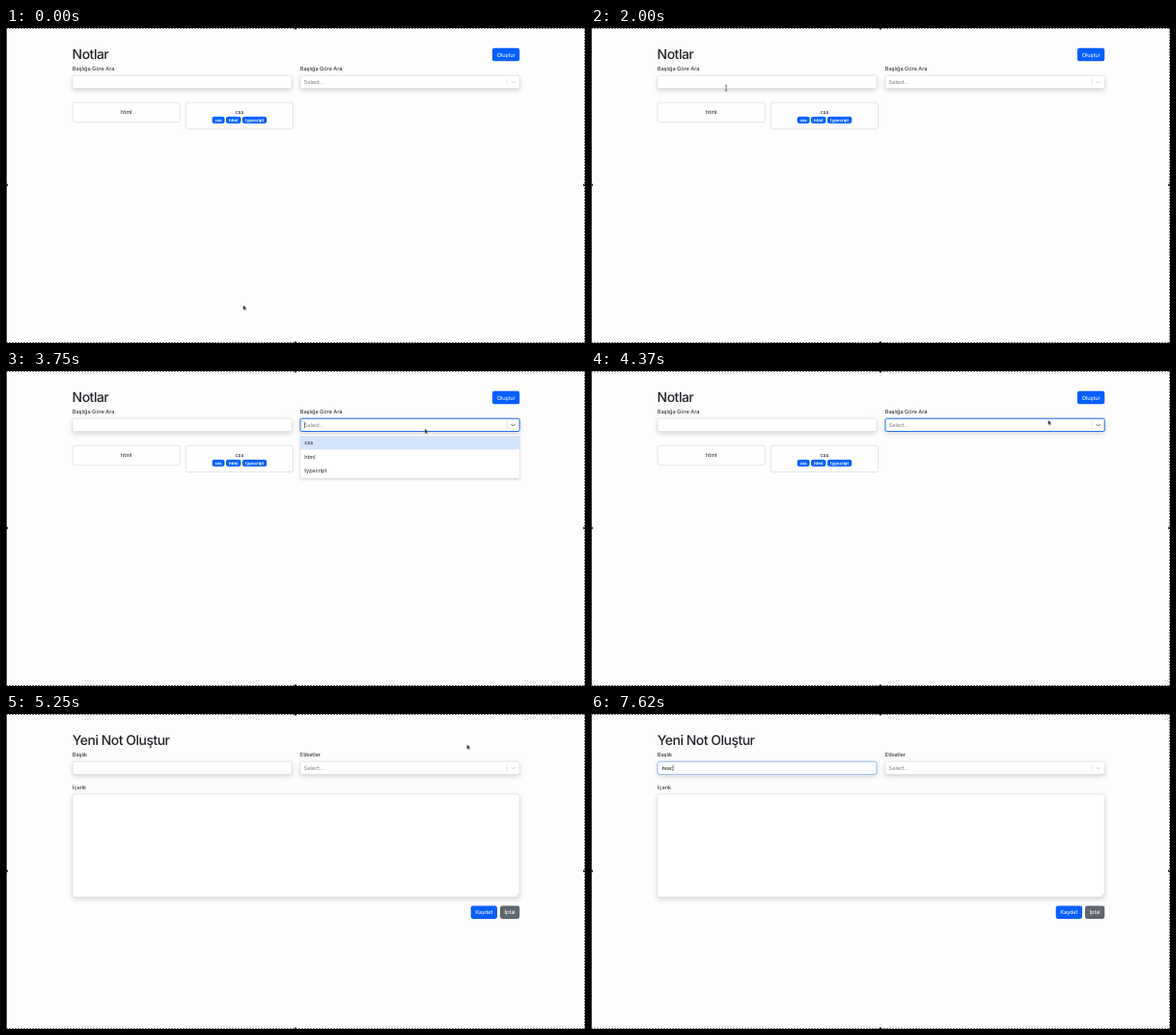
Write an HTML page that moves like this. It is 600 px wide and 326 px high and loops after 8 s.

```html
<!DOCTYPE html>
<html lang="tr">
<head>
<meta charset="utf-8">
<title>Notlar</title>
<style>
html, body { margin: 0; width: 100%; height: 100%; overflow: hidden; background: #fdfdfd; }
svg { display: block; width: 600px; height: 326px; }
text {
  font: 5.7px Inter, "Open Sans", sans-serif;
  letter-spacing: -.08px;
  fill: #212529;
  text-rendering: geometricPrecision;
}
.title { font-size: 13.9px; font-weight: 500; letter-spacing: -.45px; }
.mid { text-anchor: middle; }
.white { fill: #fff; }
.badge { font-size: 4.3px; font-weight: 700; letter-spacing: 0; fill: #fff; text-anchor: middle; }
.hint { fill: #808080; }
.primary { fill: #045ffe; }
.secondary { fill: #5f666d; }
.field { fill: #fff; stroke: #d2d6da; stroke-width: .5; filter: drop-shadow(0 2.8px 2.8px rgba(0,0,0,.16)); }
.card { fill: #fefefe; stroke: #d3d3d3; stroke-width: .6; }
.glow { fill: none; stroke: #86b7fe; stroke-width: .8; }
.ring { fill: none; stroke: #2373f5; stroke-width: 1; }
.menu { fill: #fff; stroke: #ddd; stroke-width: .4; filter: drop-shadow(0 1.4px 1.6px rgba(0,0,0,.16)); }
.line { fill: none; stroke: #ccc; stroke-width: .5; }
.chevron { fill: none; stroke: #c4c4c4; stroke-width: .8; stroke-linecap: round; stroke-linejoin: round; }
.dark { stroke: #555; }
.caret { fill: #222; }
.edge { fill: none; stroke: #777; stroke-dasharray: 2 1; }

/* The picture advances in 64 steps of 125 ms; one step is 1.5625 %. */
.anim { animation: 8s step-end -6ms infinite; }
.list { animation-name: list; }
.form { animation-name: form; }
.search { animation-name: search; }
.search-caret { animation-name: search-caret; }
.select-ring { animation-name: select-ring; }
.select-on { animation-name: select-on; }
.select-caret { animation-name: select-caret; }
.options { animation-name: options; }
.create { animation-name: create; }
.name { animation-name: name; }
.name-caret { animation-name: name-caret; }
.key1 { animation-name: key1; }
.key2 { animation-name: key2; }
.key3 { animation-name: key3; }
.key4 { animation-name: key4; }
.pointer { animation-name: pointer; }
.arrow { animation-name: arrow; }
.beam { animation-name: beam; }
.hand { animation-name: hand; }

@keyframes list { 0% { opacity: 1 } 64.0625%, 100% { opacity: 0 } }
@keyframes form { 0% { opacity: 0 } 64.0625%, 100% { opacity: 1 } }
@keyframes search {
  0% { opacity: 0 } 28.125% { opacity: .5 } 29.6875% { opacity: 1 }
  45.3125% { opacity: .3 } 46.875%, 100% { opacity: 0 }
}
@keyframes search-caret {
  0% { opacity: 0 } 28.125% { opacity: 1 } 34.375% { opacity: 0 }
  40.625% { opacity: 1 } 45.3125%, 100% { opacity: 0 }
}
@keyframes select-ring {
  0% { opacity: 0 } 45.3125% { opacity: .7 } 46.875% { opacity: 1 }
  62.5% { opacity: .35 } 64.0625%, 100% { opacity: 0 }
}
@keyframes select-on { 0% { opacity: 0 } 45.3125% { opacity: 1 } 64.0625%, 100% { opacity: 0 } }
@keyframes select-caret {
  0% { opacity: 0 } 45.3125% { opacity: 1 } 51.5625% { opacity: 0 }
  57.8125% { opacity: 1 } 62.5%, 100% { opacity: 0 }
}
@keyframes options { 0% { opacity: 0 } 45.3125% { opacity: 1 } 51.5625%, 100% { opacity: 0 } }
@keyframes create { 0% { fill: #045ffe } 60.9375% { fill: #0a56d8 } 62.5%, 100% { fill: #0950c6 } }
@keyframes name { 0% { opacity: 0 } 76.5625% { opacity: .5 } 78.125%, 100% { opacity: 1 } }
@keyframes name-caret {
  0% { opacity: 0; transform: none }
  76.5625% { opacity: 1; transform: none }
  82.8125% { opacity: 0; transform: none }
  87.5% { opacity: 1; transform: translateX(2px) }
  90.625% { opacity: 1; transform: translateX(5.3px) }
  93.75% { opacity: 1; transform: translateX(8.5px) }
  95.3125%, 100% { opacity: 1; transform: translateX(11.6px) }
}
@keyframes key1 { 0% { opacity: 0 } 87.5%, 100% { opacity: 1 } }
@keyframes key2 { 0% { opacity: 0 } 90.625%, 100% { opacity: 1 } }
@keyframes key3 { 0% { opacity: 0 } 93.75%, 100% { opacity: 1 } }
@keyframes key4 { 0% { opacity: 0 } 95.3125%, 100% { opacity: 1 } }
@keyframes pointer {
  0% { transform: translate(245.7px, 286.8px) }
  1.5625% { transform: translate(195px, 160px) }
  3.125% { transform: translate(159px, 93px) }
  6.25% { transform: translate(150px, 96px); animation-timing-function: steps(2) }
  9.375% { transform: translate(185px, 102px); animation-timing-function: steps(2) }
  12.5% { transform: translate(226.5px, 98.5px); animation-timing-function: steps(2) }
  15.625% { transform: translate(236px, 93px); animation-timing-function: steps(7) }
  26.5625% { transform: translate(124px, 57px) }
  28.125% { transform: translate(124.5px, 57.7px) }
  37.5% { transform: translate(124.5px, 57.7px); animation-timing-function: steps(4) }
  43.75% { transform: translate(434px, 59.6px) }
  53.125% { transform: translate(434px, 59.6px); animation-timing-function: steps(3) }
  57.8125% { transform: translate(553px, 33px); animation-timing-function: steps(2) }
  60.9375% { transform: translate(519.5px, 28.3px) }
  64.0625% { transform: translate(519.5px, 28.3px); animation-timing-function: steps(7) }
  75%, 100% { transform: translate(226.5px, 51px) }
}
@keyframes arrow {
  0% { opacity: 1 } 12.5% { opacity: 0 } 14.0625% { opacity: 1 } 25% { opacity: 0 }
  42.1875% { opacity: 1 } 60.9375% { opacity: 0 } 64.0625% { opacity: 1 } 75%, 100% { opacity: 0 }
}
@keyframes beam {
  0% { opacity: 0 } 12.5% { opacity: 1 } 14.0625% { opacity: 0 } 25% { opacity: 1 }
  42.1875% { opacity: 0 } 75% { opacity: 1 } 89.0625%, 100% { opacity: 0 }
}
@keyframes hand { 0% { opacity: 0 } 60.9375% { opacity: 1 } 64.0625%, 100% { opacity: 0 } }
</style>
</head>
<body>
<svg viewBox="0 0 600 326">
  <defs>
    <rect id="input" x="69" y="49.2" width="227" height="13.3" rx="2"/>
    <path id="chevron" d="M523.8 55.2l1.8 1.8 1.8-1.8"/>
    <g id="select">
      <rect class="field" x="305" y="49.2" width="227.2" height="13.3" rx="1.4"/>
      <path class="line" d="M519 52v7.8"/>
      <use href="#chevron" class="chevron"/>
      <text class="hint" x="308.6" y="58">Select...</text>
    </g>
  </defs>

  <rect width="600" height="326" fill="#fdfdfd"/>

  <g class="anim list">
    <text class="title" x="68.6" y="31.8">Notlar</text>
    <rect class="anim create" x="504" y="20.8" width="28.2" height="13.5" rx="2.1"/>
    <text class="mid white" x="518.1" y="29.7">Oluştur</text>

    <text x="68.8" y="44">Başlığa Göre Ara</text>
    <use href="#input" class="field"/>
    <use href="#input" class="glow anim search"/>
    <rect class="caret anim search-caret" x="73.4" y="52.6" width=".5" height="6.6"/>

    <text x="304.8" y="44">Başlığa Göre Ara</text>
    <use href="#select"/>
    <rect class="ring anim select-ring" x="305" y="49.2" width="227.2" height="13.3" rx="1.4"/>
    <g class="anim select-on"><use href="#chevron" class="chevron dark"/></g>
    <rect class="caret anim select-caret" x="309" y="52.6" width=".5" height="6.6"/>

    <rect class="card" x="69" y="77.2" width="111.3" height="20.2" rx="2"/>
    <text class="mid" x="124.7" y="89.2">html</text>
    <rect class="card" x="186.2" y="77.2" width="111.3" height="27.3" rx="2"/>
    <text class="mid" x="241.9" y="89.2">css</text>
    <g class="primary">
      <rect x="213.7" y="91.8" width="12.8" height="7" rx="2"/>
      <rect x="228" y="91.8" width="15.4" height="7" rx="2"/>
      <rect x="245" y="91.8" width="25.2" height="7" rx="2"/>
    </g>
    <text class="badge" x="220.1" y="96.7">css</text>
    <text class="badge" x="235.7" y="96.7">html</text>
    <text class="badge" x="257.6" y="96.7">typscript</text>

    <g class="anim options">
      <rect class="menu" x="305" y="65.5" width="227.2" height="45.6" rx="1.4"/>
      <rect x="305" y="67" width="227.2" height="14.3" fill="#d3e3f9"/>
      <text x="309.2" y="76.2">css</text>
      <text x="309.2" y="90.5">html</text>
      <text x="309.2" y="104.8">typscript</text>
    </g>
  </g>

  <g class="anim form">
    <text class="title" x="68.8" y="31.8">Yeni Not Oluştur</text>
    <text x="68.8" y="44">Başlık</text>
    <use href="#input" class="field"/>
    <use href="#input" class="glow anim name"/>
    <text x="73.4" y="58"><tspan class="anim key1">r</tspan></text>
    <text class="anim key1" x="73.4" y="58">r</text>
    <text class="anim key2" x="75.4" y="58">e</text>
    <text class="anim key3" x="78.7" y="58">a</text>
    <text class="anim key4" x="81.9" y="58">c</text>
    <rect class="caret anim name-caret" x="73.4" y="52.6" width=".5" height="6.6"/>

    <text x="304.8" y="44">Etiketler</text>
    <use href="#select"/>

    <text x="68.8" y="77.7">İçerik</text>
    <rect class="field" x="69" y="83" width="463.2" height="106.5" rx="2"/>
    <path d="M529 188.6l2.4-2.4M530.4 188.6l1-1" stroke="#888" stroke-width=".4"/>

    <rect class="primary" x="481.7" y="198.4" width="27.3" height="13.5" rx="2.1"/>
    <text class="mid white" x="495.3" y="207.3">Kaydet</text>
    <rect class="secondary" x="512" y="198.4" width="20.2" height="13.5" rx="2.1"/>
    <text class="mid white" x="522.1" y="207.3">İptal</text>
  </g>

  <path class="edge" d="M0 .5H600M0 325.5H600M599.5 0V326"/>
  <path d="M.5 0V326" stroke="#444"/>
  <path d="M0 162.5h2M598 162.5h2M299 .5h2M299 325.5h2" stroke="#222" stroke-width="2"/>

  <g class="anim pointer">
    <path class="anim arrow" d="M0 0V5l1.2-1.1.8 1.8.9-.4-.8-1.7h1.6z" fill="#111" stroke="#fff" stroke-width=".3"/>
    <path class="anim beam" d="M-1.1-2.9Q0-2.9 0-2.2V2.2Q0 2.9-1.1 2.9M1.1-2.9Q0-2.9 0-2.2M0 2.2Q0 2.9 1.1 2.9" fill="none" stroke="#222" stroke-width=".6"/>
    <path class="anim hand" d="M-.6 0Q0-.5.5 0V2.1l2 .5q.6.3.4 1.2L2.4 5.8H-.6L-2.3 3.4q.2-.8 1-.2l.7.5z" fill="#fff" stroke="#111" stroke-width=".5"/>
  </g>
</svg>
</body>
</html>
```
